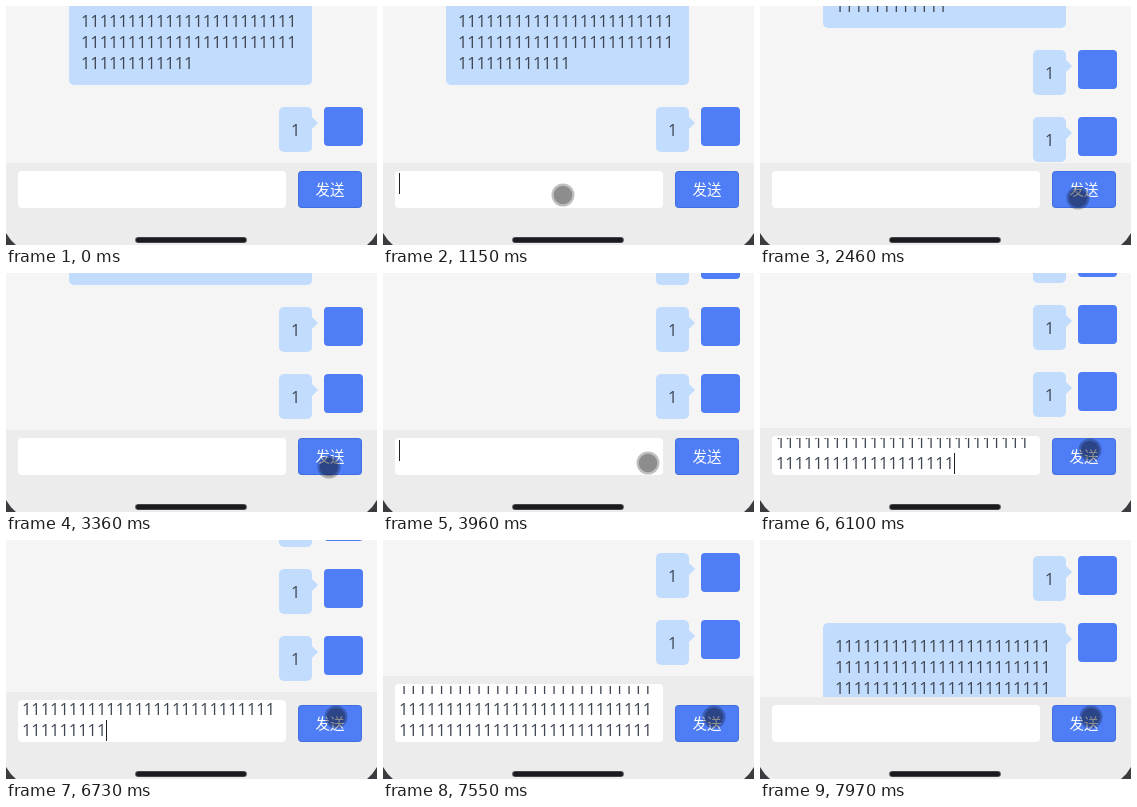
Animation of 371x239 px, one loop 8000 ms. Source, as an HTML page with a canvas:

```html
<!DOCTYPE html>
<html lang="zh">
<head>
<meta charset="utf-8">
<title>聊天</title>
<style>
  html, body { margin: 0; width: 100%; height: 100%; overflow: hidden; background: #f5f5f5; }
  canvas { display: block; }
</style>
</head>
<body>
<canvas id="stage" width="371" height="239"></canvas>
<script>
const ctx = document.getElementById('stage').getContext('2d');
const LOOP = 8000;
const LINE = 21;
const DIGIT_FONT = '16.4px "Open Sans", "Noto Sans", sans-serif';
const LABEL_FONT = '14.5px "Noto Sans CJK SC", "Noto Sans CJK", sans-serif';
const BLUE = '#4e7df5', BUBBLE = '#c2dcfe', INK = '#3d4552';

const SENDS = [[1985, 67], [3340, 67], [7590, 130]]; // time, scroll distance
const SCROLL_TIME = 630;
const REPEAT = { start: 4440, every: 37, max: 81 };
const GROW_TIME = 400;
const GROWTH = [0, 12, 29]; // extra input height for 1, 2, 3 lines
const PER_LINE = 27;

const POINTER = [ // time, x, y
  [530, 349, 100], [1080, 180, 189], [1220, 180, 189], [1360, 321, 192],
  [1500, 321, 192], [1570, 320, 192], [1990, 320, 192], [2200, 318, 192],
  [2480, 318, 192], [2740, 210, 190], [2870, 210, 190], [3150, 323, 194],
  [3500, 323, 194], [3900, 265, 190], [3990, 265, 190], [4100, 329, 177],
  [4500, 329, 177], [4700, 330, 177], [7100, 330, 177], [7400, 331, 177]
];

const clamp = v => Math.max(0, Math.min(1, v));
const smooth = v => { v = clamp(v); return v * v * (3 - 2 * v); };
const within = (t, a, b) => t >= a && t < b;

function box(x, y, w, h, r, color) {
  ctx.fillStyle = color;
  ctx.beginPath();
  ctx.roundRect(x, y, w, h, r);
  ctx.fill();
}

function digits(count, x, baseline) {
  ctx.font = DIGIT_FONT;
  ctx.textAlign = 'left';
  ctx.fillStyle = INK;
  ctx.fillText('1'.repeat(count), x, baseline);
}

function message(top, lines) {
  const left = lines.length > 1 ? 63 : 273;
  box(left, top, 306 - left, 45 + LINE * (lines.length - 1), 5, BUBBLE);
  ctx.beginPath();
  ctx.moveTo(305, top + 9);
  ctx.lineTo(312, top + 16);
  ctx.lineTo(305, top + 23);
  ctx.fill();
  lines.forEach((n, i) => digits(n, left + 12, top + 29 + LINE * i));
  box(318, top, 39, 39, 4, BLUE);
}

// Held key: each repeat restarts the height transition of the input.
function inputState(t) {
  if (within(t, 1330, 1985) || within(t, 3010, 3340)) return { count: 1, growth: 0 };
  if (!within(t, 4050, 7590)) return { count: 0, growth: 0 };
  if (t < REPEAT.start) return { count: 1, growth: 0 };
  const steps = Math.min(REPEAT.max - 2, Math.floor((t - REPEAT.start) / REPEAT.every));
  const count = steps + 2;
  const sinceKey = t - REPEAT.start - steps * REPEAT.every;
  const eased = 1 - (1 - clamp(sinceKey / GROW_TIME)) ** 2;
  return { count, growth: Math.round(GROWTH[Math.ceil(count / PER_LINE) - 1] * eased) };
}

function drawInput(t, count, growth) {
  const top = 165 - growth;
  box(12, top, 268, 37 + growth, 4, '#fff');

  const rows = Math.max(1, Math.ceil(count / PER_LINE));
  const lastRow = count - (rows - 1) * PER_LINE;
  const baseline = rows > 1 ? 196 : 183;
  ctx.save();
  ctx.beginPath();
  ctx.rect(12, top + 2, 268, 35 + growth);
  ctx.clip();
  for (let i = 0; i < rows; i++) {
    digits(i < rows - 1 ? PER_LINE : lastRow, 16, baseline - LINE * (rows - 1 - i));
  }
  const focused = within(t, 1120, 1350) || within(t, 2800, 3150) || within(t, 3930, 7590);
  if (focused && count < REPEAT.max) {
    const x = Math.round(16 + ctx.measureText('1'.repeat(lastRow)).width);
    ctx.fillStyle = '#222';
    ctx.fillRect(x, baseline - 16, 1, LINE);
  }
  ctx.restore();
}

function drawButton() {
  box(292, 165, 64, 37, 4, '#426fe0');
  box(293, 166, 62, 35, 3, BLUE);
  ctx.font = LABEL_FONT;
  ctx.textAlign = 'center';
  ctx.fillStyle = '#fff';
  ctx.fillText('发送', 324, 189);
}

function drawPhoneEdge() {
  box(129, 231, 112, 6, 3, '#6d6d72');
  box(130, 231.5, 110, 5, 2.5, '#1b1b1f');
  ctx.fillStyle = '#3c3c40';
  for (const [x, dir] of [[0, 1], [371, -1]]) {
    ctx.beginPath();
    ctx.moveTo(x, 227);
    ctx.quadraticCurveTo(x + 4 * dir, 234, x + 10 * dir, 239);
    ctx.lineTo(x, 239);
    ctx.fill();
  }
}

function drawPointer(t) {
  if (t < POINTER[0][0]) return;
  let i = POINTER.length - 1;
  while (POINTER[i][0] > t) i--;
  const [t0, x0, y0] = POINTER[i];
  const [t1, x1, y1] = POINTER[i + 1] || [LOOP, x0, y0];
  const p = smooth((t - t0) / (t1 - t0));
  const x = x0 + (x1 - x0) * p, y = y0 + (y1 - y0) * p;
  for (const [radius, alpha] of [[11.5, 0.25], [9.3, 0.26]]) {
    ctx.fillStyle = `rgba(0,0,0,${alpha})`;
    ctx.beginPath();
    ctx.arc(x, y, radius, 0, Math.PI * 2);
    ctx.fill();
  }
}

function draw(t) {
  const { count, growth } = inputState(t);
  const scroll = SENDS.reduce((sum, [at, by]) => sum + by * smooth((t - at) / SCROLL_TIME), 0);
  const shift = Math.round(scroll) + growth;

  ctx.fillStyle = '#f5f5f5';
  ctx.fillRect(0, 0, 371, 239);
  message(-71 - shift, [23, 23, 23, 23, 23, 12]);
  for (const top of [101, 168, 235]) message(top - shift, [1]);
  message(302 - shift, [23, 23, 23, 12]);

  ctx.fillStyle = '#ececec';
  ctx.fillRect(0, 157 - growth, 371, 82 + growth);
  drawInput(t, count, growth);
  drawButton();
  drawPhoneEdge();
  drawPointer(t);
}

const start = performance.now();
function tick() {
  draw((performance.now() - start) % LOOP);
  requestAnimationFrame(tick);
}
tick();
</script>
</body>
</html>
```
